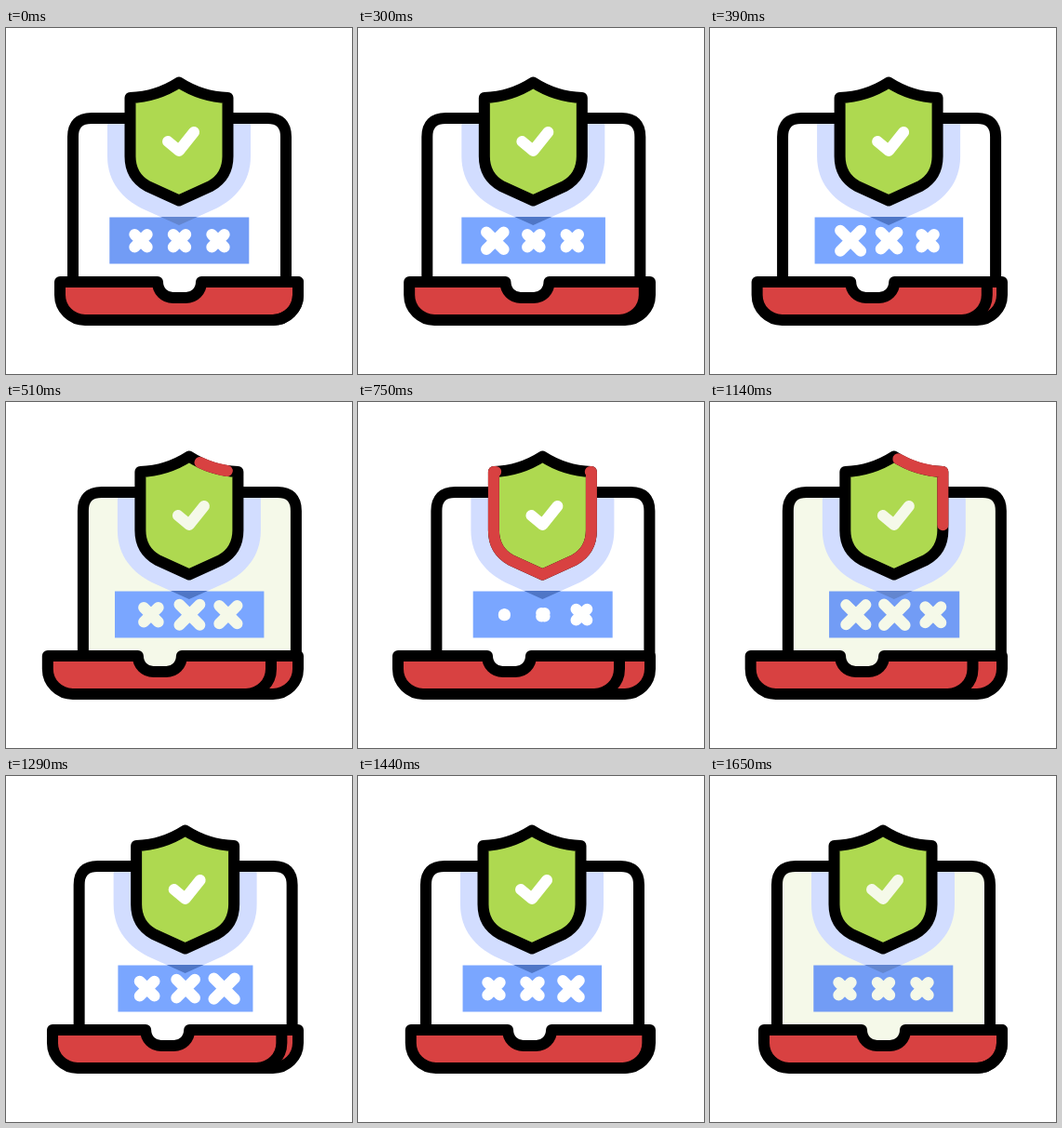
Recreate the animation shown at these times as an HTML page. Size 372 by 372 pixels, loop 2250 ms.

```html
<!DOCTYPE html>
<html lang="en">
<head>
<meta charset="utf-8">
<title>Secure laptop</title>
<style>
  html, body { margin: 0; width: 100%; height: 100%; overflow: hidden; background: #fff; }
  svg { display: block; width: 100vw; height: 100vh; --paper: #fff; --panel: #729cf5; --tip: #6386d0; }
  .line { fill: none; stroke: #000; stroke-width: 12; stroke-linecap: round; stroke-linejoin: round; }
  .paper { fill: var(--paper); }
  .mark { stroke: var(--paper); }
  .red { stroke: #d84141; }
</style>
</head>
<body>
<svg viewBox="0 0 372 372">
  <defs>
    <path id="halo" d="M109 103V138C109 166 126 184 146 194L186 212L226 194C246 184 263 166 263 138V103Z"/>
    <path id="shield" pathLength="1" d="M186 58.5Q210 74 238.5 75V138C238.5 156 229 165 220 170L186 185.5L152 170C143 165 133.5 156 133.5 138V75Q162 74 186 58.5Z"/>
    <clipPath id="panelClip"><rect y="203" width="372" height="51"/></clipPath>
  </defs>
  <g id="lid">
    <path class="line" style="fill: var(--paper)" d="M72 273V117Q72 97 92 97H281Q301 97 301 117V273"/>
    <use href="#halo" fill="#d2ddff"/>
    <rect id="panel" y="203.5" height="50" fill="var(--panel)"/>
    <use href="#halo" fill="var(--tip)" clip-path="url(#panelClip)"/>
    <path class="line mark"/>
    <path class="line mark"/>
    <path class="line mark"/>
    <use href="#shield" class="line" style="fill: #aed950"/>
    <path id="trace" class="line red" pathLength="1"/>
    <path class="line mark" d="M174 122L186 132L202 112"/>
  </g>
  <rect id="gap" class="paper" y="265" width="36" height="25"/>
  <path id="base" class="line" style="fill: #d84141"/>
  <path id="edge" class="line"/>
</svg>
<script>
const LOOP = 2250, STEP = 30;
const $ = id => document.getElementById(id);
const svg = document.querySelector('svg');
const crosses = [...document.querySelectorAll('#lid rect ~ .mark')].slice(0, 3);
$('trace').setAttribute('d', $('shield').getAttribute('d'));

function set(el, attrs) {
  for (const name in attrs) el.setAttribute(name, attrs[name]);
}

// Eased interpolation through [time, value] keys
function track(t, ...keys) {
  if (t <= keys[0][0]) return keys[0][1];
  for (let i = 1; i < keys.length; i++) {
    const [a, from] = keys[i - 1], [b, to] = keys[i];
    if (t < b) {
      const u = (t - a) / (b - a);
      return from + (to - from) * u * u * (3 - 2 * u);
    }
  }
  return keys[keys.length - 1][1];
}

function setTones(t) {
  const rest = t < 180 || t >= 1650;
  const dim = rest || (t >= 1050 && t < 1260);
  const cream = t >= 1650 || (dim && !rest) || (t >= 450 && t < 600);
  svg.style.setProperty('--paper', cream ? '#f5f9e9' : '#fff');
  svg.style.setProperty('--panel', dim ? '#729cf5' : '#7aa6ff');
  svg.style.setProperty('--tip', dim ? '#6386d0' : '#4f76c6');
}

function draw(t) {
  setTones(t);

  const turn = track(t, [185, 0], [600, 1], [1085, 1], [1515, 0]);
  set($('lid'), { transform: `translate(${12.4 * turn} 0)` });

  const width = track(t, [180, 150], [450, 161], [1050, 139], [1500, 150]);
  set($('panel'), { x: 186.3 - width / 2, width });

  crosses.forEach((cross, i) => {
    const r = track(t - [0, 105, 200][i], [180, 6.7], [390, 11], [720, 0.3], [1050, 11.3], [1410, 6.7]);
    const x = 145 + 41.5 * i, y = 228.7;
    set(cross, { d: `M${x - r} ${y - r}L${x + r} ${y + r}M${x + r} ${y - r}L${x - r} ${y + r}` });
  });

  const head = track(t, [420, 0], [850, 1], [1300, 0]);
  const tail = track(t, [420, 0], [700, 0.14], [800, 0.14], [1220, 0]);
  const length = head - tail;
  set($('trace'), {
    visibility: length > 0.002 ? 'visible' : 'hidden',
    'stroke-dasharray': `${Math.max(length, 0)} 2`,
    'stroke-dashoffset': -tail
  });

  const left = 58 - 15 * turn, notch = 186.5 - 24 * turn, front = 314 - 33 * turn;
  set($('gap'), { x: notch - 18 });
  set($('base'), {
    d: `M${left} 273V287A27 27 0 0 0 ${left + 27} 314H287A27 27 0 0 0 314 287V273
        H${notch + 23.5}C${notch + 23.5} 283 ${notch + 16} 290 ${notch + 7} 290
        H${notch - 7}C${notch - 16} 290 ${notch - 23.5} 283 ${notch - 23.5} 273Z`
  });
  set($('edge'), { d: `M${front} 273V287A27 27 0 0 1 ${front - 27} 314` });
}

function tick() {
  const t = performance.now() % LOOP;
  draw(Math.floor(t / STEP) * STEP);
  requestAnimationFrame(tick);
}
tick();
</script>
</body>
</html>
```
